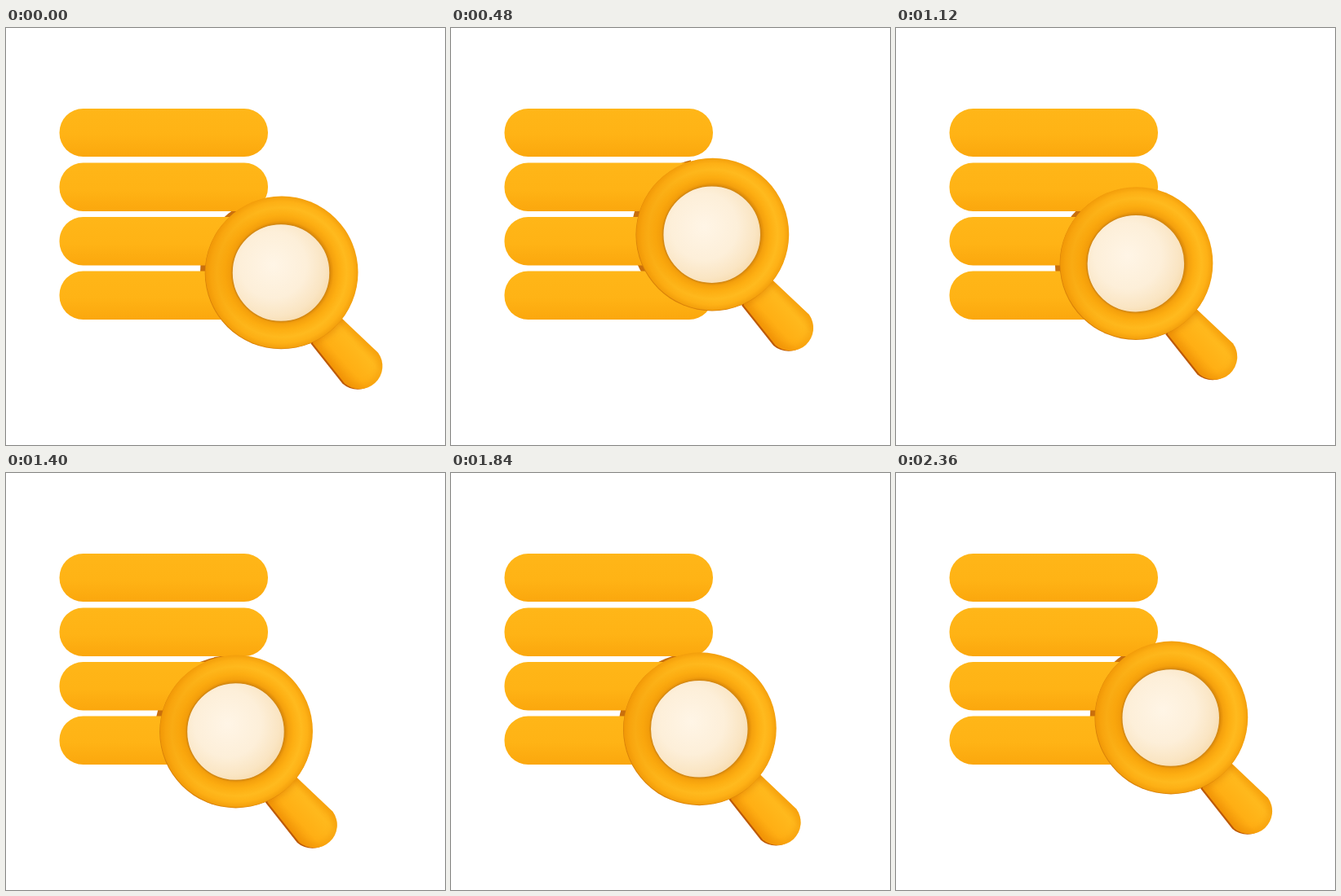
Animation, 538 px wide and 512 px high, one loop 2.4 s. Source, as an HTML page:

```html
<!DOCTYPE html>
<html lang="en">
<head>
<meta charset="utf-8">
<title>List search</title>
<style>
  html, body { margin: 0; width: 100%; height: 100%; overflow: hidden; background: #fff; }
  svg { display: block; width: 538px; height: 512px; }
</style>
</head>
<body>
<svg viewBox="0 0 538 512">
  <defs>
    <g id="bars">
      <rect x="65.5" y="99" width="255.5" height="59" rx="29"/>
      <rect x="65.5" y="165.5" width="255.5" height="59.5" rx="29"/>
      <rect x="65.5" y="232" width="255.5" height="59.5" rx="29"/>
      <rect x="65.5" y="298.5" width="255.5" height="59.5" rx="29"/>
    </g>
    <clipPath id="inBars"><use href="#bars"/></clipPath>
    <clipPath id="inList"><rect x="94" y="104" width="200" height="250"/></clipPath>
    <path id="handle" d="M50 35L73 56L118 98.7A28 28 0 0 1 77 136.3L38 87Z"/>
    <clipPath id="inHandle"><use href="#handle"/></clipPath>

    <filter id="soft" x="-20%" y="-20%" width="140%" height="140%"><feGaussianBlur stdDeviation="4"/></filter>
    <filter id="wide" x="-20%" y="-20%" width="140%" height="140%"><feGaussianBlur stdDeviation="7"/></filter>

    <linearGradient id="barFill" x2="0" y2="1">
      <stop offset="0" stop-color="#ffb618"/>
      <stop offset=".55" stop-color="#ffb315"/>
      <stop offset="1" stop-color="#fba70d"/>
    </linearGradient>
    <radialGradient id="ringFill" gradientUnits="userSpaceOnUse" cx="0" cy="0" r="93.5">
      <stop offset=".64" stop-color="#e08c08"/>
      <stop offset=".68" stop-color="#f5a10d"/>
      <stop offset=".75" stop-color="#fdae12"/>
      <stop offset=".85" stop-color="#ffba1e"/>
      <stop offset=".93" stop-color="#feb116"/>
      <stop offset="1" stop-color="#f39f0c"/>
    </radialGradient>
    <linearGradient id="ringShade" x1="0" y1=".45" x2="1" y2=".55">
      <stop offset="0" stop-color="#ee8e00" stop-opacity=".45"/>
      <stop offset=".3" stop-color="#f49a00" stop-opacity=".12"/>
      <stop offset=".6" stop-color="#f49a00" stop-opacity="0"/>
    </linearGradient>
    <radialGradient id="glass" cx=".42" cy=".42" r=".62">
      <stop offset="0" stop-color="#fff5e6"/>
      <stop offset=".55" stop-color="#fdefd9"/>
      <stop offset=".85" stop-color="#fae5c3"/>
      <stop offset="1" stop-color="#f7dcb0"/>
    </radialGradient>
    <linearGradient id="handleFill" gradientUnits="userSpaceOnUse" x1="57" y1="112" x2="97" y2="76">
      <stop offset="0" stop-color="#f59a0a"/>
      <stop offset=".3" stop-color="#ffaf14"/>
      <stop offset=".75" stop-color="#ffb91d"/>
      <stop offset="1" stop-color="#fcae14"/>
    </linearGradient>
  </defs>

  <g clip-path="url(#inList)">
    <circle class="lens" cx="-7" r="93" fill="#c96f0c"/>
  </g>

  <g fill="url(#barFill)"><use href="#bars"/></g>
  <g clip-path="url(#inBars)">
    <g fill="none" stroke="#ec8a00" stroke-width="9" opacity=".6" filter="url(#soft)"><use href="#bars"/></g>
    <g class="lens">
      <circle cx="-4" r="95" fill="#d87400" opacity=".6" filter="url(#wide)"/>
    </g>
  </g>

  <g class="lens">
    <use href="#handle" x="-2.5" y=".5" fill="#bd5a06"/>
    <use href="#handle" fill="url(#handleFill)"/>
    <g clip-path="url(#inHandle)">
      <use href="#handle" fill="none" stroke="#ec8a00" stroke-width="7" opacity=".55" filter="url(#soft)"/>
      <circle r="96" fill="#dc7c00" opacity=".55" filter="url(#soft)"/>
    </g>
    <circle cx="-.8" cy=".8" r="93.5" fill="#d98208"/>
    <circle r="93.5" fill="url(#ringFill)"/>
    <circle r="93.5" fill="url(#ringShade)"/>
    <circle cx="-1" cy=".5" r="60" fill="url(#glass)" stroke="#d58a14" stroke-width="1.5"/>
  </g>
</svg>
<script>
  const LOOP = 2400, STEP = 40;
  const stops = [[338, 300], [316, 240.3], [279, 325]];
  const movers = document.querySelectorAll('.lens');

  // cubic-bezier(0, 0, .58, 1), solved by bisection
  function easeOut(x) {
    let low = 0, high = 1, s;
    for (let i = 0; i < 24; i++) {
      s = (low + high) / 2;
      if (1.74 * (1 - s) * s * s + s ** 3 < x) low = s; else high = s;
    }
    return s * s * (3 - 2 * s);
  }

  function draw(now) {
    const time = Math.floor(now % LOOP / STEP) * STEP;
    const leg = time / LOOP * stops.length;
    const index = Math.floor(leg);
    const from = stops[index], to = stops[(index + 1) % stops.length];
    const k = easeOut(leg - index);
    const [x, y] = from.map((v, i) => v + (to[i] - v) * k);
    movers.forEach(m => m.setAttribute('transform', `translate(${x} ${y})`));
  }

  function tick() {
    draw(performance.now());
    requestAnimationFrame(tick);
  }
  tick();
</script>
</body>
</html>
```
